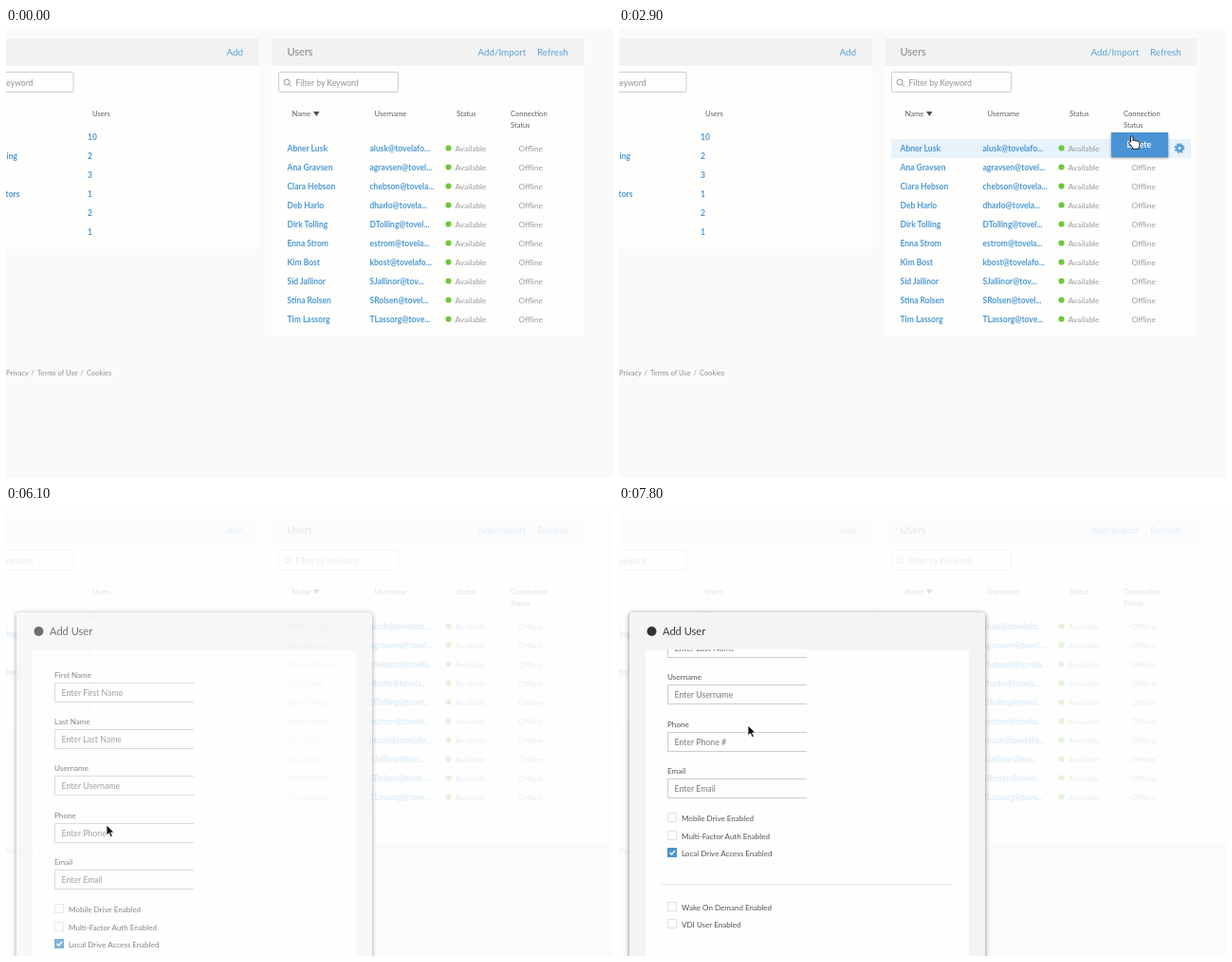
An HTML page for the animation above (8 s loop, 640 px wide and 474 px high).

```html
<!DOCTYPE html>
<html lang="en">
<head>
<meta charset="utf-8">
<title>User admin</title>
<style>
html, body { margin: 0; width: 100%; height: 100%; overflow: hidden; background: #fafafb; }
svg { display: block; width: 640px; height: 474px; font-family: Lato, "Open Sans", sans-serif; }
.link { fill: #5aa2d6; font-size: 9.8px; }
.title { fill: #858585; font-size: 11px; }
.head { fill: #606060; font-size: 7.6px; }
.cell { fill: #9a9a9a; font-size: 8.4px; }
.bold { fill: #4c98d0; font-size: 8.5px; font-weight: 700; }
.hint { fill: #929292; font-size: 8.6px; }
.entry { fill: #7c7c7c; font-size: 8.75px; }
.foot { fill: #909090; font-size: 7.5px; }
.name { fill: #3c3c3c; font-size: 11.1px; }
.label { fill: #555; font-size: 8.15px; }
.check { fill: #555; font-size: 8.05px; }
.white { fill: #fefefd; }
.bar { fill: #f2f2f2; }
.box { fill: #fefefe; stroke: #cfcfcf; }
.modal { filter: drop-shadow(0 1px 2.5px rgba(0,0,0,.5)); }

.anim { animation: 8s linear infinite; }
#cursor { animation-name: travel; }
#hand { animation-name: hand; animation-timing-function: step-end; }
#arrow { animation-name: arrow; animation-timing-function: step-end; }
#hover { animation-name: hover; animation-timing-function: step-end; }
#menu { animation-name: menu; }
#menuOn { animation-name: menu-on; animation-timing-function: step-end; }
#veil { animation-name: veil; }
#pick { animation-name: pick; }
#pickOn { animation-name: pick-on; animation-timing-function: step-end; }
#form { animation-name: form; }
#fields { animation-name: scroll; }
#thumb { animation-name: thumb; }
#thumbFade { animation-name: thumb-fade; }

@keyframes travel {
  0%, 1.25% { transform: translate(648px, 290px); }
  8.75% { transform: translate(608px, 165px); }
  12.5%, 23.75% { transform: translate(591px, 127px); animation-timing-function: ease-in-out; }
  30%, 37% { transform: translate(541px, 114px); animation-timing-function: ease-in-out; }
  43.75%, 47.5% { transform: translate(558px, 24px); animation-timing-function: ease-in-out; }
  50.5%, 61.25% { transform: translate(534px, 24px); animation-timing-function: ease-in-out; }
  65.5%, 81.25% { transform: translate(106px, 336px); animation-timing-function: ease-in-out; }
  83.5%, 100% { transform: translate(136px, 231px); }
}
@keyframes hand {
  0%, 25%, 38%, 62%, 73.75%, 100% { opacity: 0; }
  12%, 28%, 43%, 65% { opacity: 1; }
}
@keyframes arrow {
  0%, 25%, 38%, 62%, 73.75%, 100% { opacity: 1; }
  12%, 28%, 43%, 65% { opacity: 0; }
}
@keyframes hover {
  0% { opacity: 0; transform: translateY(20px); }
  10% { opacity: 1; transform: translateY(20px); }
  11.5% { opacity: 1; transform: none; }
  38.7%, 100% { opacity: 0; transform: none; }
}
@keyframes menu {
  0%, 25% { opacity: 0; }
  26.2%, 38.7% { opacity: 1; }
  42.5%, 48.7% { opacity: .35; }
  50%, 100% { opacity: 0; }
}
@keyframes menu-on {
  0%, 38.7%, 100% { opacity: 0; }
  28.5% { opacity: 1; }
}
@keyframes veil { 0%, 52.5% { opacity: 0; } 56.25%, 100% { opacity: 1; } }
@keyframes pick {
  0%, 52.5% { opacity: 0; }
  56.25%, 73% { opacity: 1; }
  75%, 100% { opacity: 0; }
}
@keyframes pick-on { 0%, 100% { opacity: 0; } 65% { opacity: 1; } }
@keyframes form { 0%, 73.2% { opacity: 0; } 77.5%, 100% { opacity: 1; } }
@keyframes scroll {
  0%, 85% { transform: none; animation-timing-function: ease-in-out; }
  91.25%, 100% { transform: translateY(-96px); }
}
@keyframes thumb {
  0%, 85% { transform: none; animation-timing-function: ease-in-out; }
  91.25%, 100% { transform: translateY(74px); }
}
@keyframes thumb-fade {
  0%, 84.5% { opacity: 0; }
  85%, 93.75% { opacity: 1; }
  97.5%, 100% { opacity: 0; }
}
</style>
</head>
<body>
<svg viewBox="0 0 640 474">
  <defs>
    <linearGradient id="shade" x2="0" y2="1">
      <stop stop-color="#f8f8f9"/><stop offset="1" stop-color="#e3e4e8"/>
    </linearGradient>
    <clipPath id="view"><rect x="28" y="151.5" width="341" height="330"/></clipPath>
  </defs>
  <rect width="640" height="474" fill="#fafafb"/>

  <!-- left panel -->
  <rect class="white" x="-5" y="11" width="272" height="221"/>
  <rect class="bar" x="-5" y="11" width="272" height="29"/>
  <text class="link" x="232.5" y="29">Add</text>
  <rect class="box" x="-50.5" y="46.5" width="121.5" height="21" rx="1"/>
  <text class="hint" x="28.5" y="61" text-anchor="end">Filter by Keyword</text>
  <text class="head" x="91" y="93">Users</text>
  <text class="bold" x="12" y="138" text-anchor="end">ing</text>
  <text class="bold" x="14.5" y="178" text-anchor="end">tors</text>
  <g id="counts"></g>

  <!-- right panel -->
  <rect class="white" x="280" y="11" width="329" height="313"/>
  <rect class="bar" x="280" y="11" width="329" height="29"/>
  <text class="title" x="296.5" y="29">Users</text>
  <text class="link" x="497.5" y="29">Add/Import</text>
  <text class="link" x="560" y="29">Refresh</text>
  <rect class="box" x="287.5" y="46.5" width="126" height="21" rx="1"/>
  <g fill="none" stroke="#999"><circle cx="296" cy="57" r="3"/><path d="M298.2 59.2l2.6 2.6"/></g>
  <text class="hint" x="305.5" y="61">Filter by Keyword</text>
  <text class="head" x="301.5" y="93">Name</text>
  <path d="M324 88h6.5l-3.2 5z" fill="#505050"/>
  <text class="head" x="388.5" y="93">Username</text>
  <text class="head" x="475" y="93">Status</text>
  <text class="head" x="532" y="93">Connection</text>
  <text class="head" x="532" y="105">Status</text>
  <g id="hover" class="anim">
    <rect x="287" y="117" width="316" height="20" fill="#e7f2fb"/>
    <circle cx="591" cy="126.5" r="2.9" fill="none" stroke="#5b9fd6" stroke-width="2.6"/>
    <circle cx="591" cy="126.5" r="4.6" fill="none" stroke="#5b9fd6" stroke-width="1.6" stroke-dasharray="2 1.613"/>
  </g>
  <g id="rows"></g>
  <text class="foot" x="24" y="366" text-anchor="end">Privacy</text>
  <text class="foot" x="26.5" y="366">/</text>
  <text class="foot" x="33" y="366">Terms of Use</text>
  <text class="foot" x="78.5" y="366">/</text>
  <text class="foot" x="85" y="366">Cookies</text>

  <g id="menu" class="anim">
    <rect x="519" y="110" width="60" height="26" fill="#fdfdfd" style="filter:drop-shadow(0 1px 1.5px rgba(0,0,0,.4))"/>
    <text x="535.5" y="126" font-size="8.6" fill="#999">Delete</text>
    <g id="menuOn" class="anim">
      <rect x="519" y="110" width="60" height="26" fill="#4a94d6"/>
      <text x="535.5" y="126" font-size="8.6" font-weight="700" fill="#fff">Delete</text>
    </g>
  </g>

  <g id="veil" class="anim">
    <rect width="640" height="474" fill="#fefefe" opacity=".82"/>
    <rect x="386" y="356" width="254" height="118" fill="#fbfbfd"/>
  </g>

  <!-- add or import dialog -->
  <g id="pick" class="anim">
    <rect class="modal" x="11" y="185.5" width="375" height="275.5" rx="3" fill="#f4f4f5"/>
    <path d="M11 411h375v47a3 3 0 0 1-3 3h-369a3 3 0 0 1-3-3z" fill="url(#shade)"/>
    <path d="M11 411h375" stroke="#e6e6e8"/>
    <circle cx="34.5" cy="207" r="5" fill="#333"/>
    <text class="name" x="46" y="211">Tovela Forge Inc</text>
    <rect class="white" x="28" y="226" width="341" height="176"/>
    <rect x="28" y="226" width="341" height="27" fill="#eeeeef"/>
    <text x="47.5" y="242" font-size="10.2" fill="#777">Add/Import Users</text>
    <rect class="box" x="74.5" y="269.5" width="103" height="115" rx="2"/>
    <rect id="pickOn" class="anim" x="74.5" y="269.5" width="103" height="115" rx="2" fill="#f4f4f5" stroke="#cfcfcf"/>
    <circle cx="125" cy="318" r="37" fill="#babac0"/>
    <path d="M109.5 318h31M125 302.5v31" stroke="#fff" stroke-width="12" stroke-linecap="round"/>
    <text x="104" y="377" font-size="11" fill="#555">Add User</text>
    <rect class="box" x="215.5" y="269.5" width="103" height="115" rx="2"/>
    <g fill="none" stroke="#b8b8be" stroke-width="5.5" stroke-linejoin="round">
      <path d="M233 278h43l23 22v56q0 2-2 2h-64q-2 0-2-2v-76q0-2 2-2z"/>
      <path d="M276 278v22h23"/>
      <path d="M254 314l22 32" stroke-width="7"/>
      <path d="M276 314l-22 32" stroke-width="5"/>
      <path d="M248 314h14M268 314h14M248 346h14M268 346h14" stroke-width="5"/>
    </g>
    <text x="235.5" y="377" font-size="11" fill="#555">Import Users</text>
    <rect x="294" y="424" width="73" height="23" rx="2" fill="#bac4ca"/>
    <text x="330.5" y="439" font-size="10.8" font-weight="700" fill="#fff" text-anchor="middle">Close</text>
  </g>

  <!-- new user dialog -->
  <g id="form" class="anim">
    <rect class="modal" x="11" y="112" width="375" height="400" rx="3" fill="#f4f4f5"/>
    <circle cx="34.5" cy="132" r="5" fill="#333"/>
    <text class="name" x="46" y="136">Add User</text>
    <rect class="white" x="28" y="151.5" width="341" height="330"/>
    <g clip-path="url(#view)">
      <g id="fields" class="anim"></g>
      <g id="thumbFade" class="anim">
        <rect id="thumb" class="anim" x="361.5" y="153" width="5.5" height="310" rx="2.7" fill="#000" fill-opacity=".45"/>
      </g>
    </g>
  </g>

  <g id="cursor" class="anim">
    <path id="arrow" class="anim" d="M0 0v11l2.6-2.4 1.7 4 2-.9-1.7-3.8h3.4z" fill="#111" stroke="#fff" stroke-width=".8"/>
    <path id="hand" class="anim" d="M-1.5 1q0-1.2 1.2-1.2T1 1v4q.2-1 1.3-.9t1.2 1.2q.3-.8 1.3-.6t1.1 1.2q.3-.6 1.1-.4t.9 1.3v2.4q0 1.3-1 2.6v1.7h-6.4v-1.5l-3.8-4.6q-.5-1 .4-1.5t1.4.5z" fill="#fff" stroke="#222" stroke-linejoin="round"/>
  </g>
</svg>
<script>
const users = [
  ["Abner Lusk", "alusk@tovelafo..."],
  ["Ana Gravsen", "agravsen@tovel..."],
  ["Clara Hebson", "chebson@tovela..."],
  ["Deb Harlo", "dharlo@tovela..."],
  ["Dirk Tolling", "DTolling@tovel..."],
  ["Enna Strom", "estrom@tovela..."],
  ["Kim Bost", "kbost@tovelafo..."],
  ["Sid Jallinor", "SJallinor@tov..."],
  ["Stina Rolsen", "SRolsen@tovel..."],
  ["Tim Lassorg", "TLassorg@tove..."]
];
const text = (cls, x, y, str) => `<text class="${cls}" x="${x}" y="${y}">${str}</text>`;
const fill = (id, list, draw) => {
  document.getElementById(id).innerHTML += list.map(draw).join("");
};

fill("counts", [10, 2, 3, 1, 2, 1], (n, i) => text("bold", 86, 118 + 20 * i, n));

fill("rows", users, ([name, login], i) => {
  const y = 130 + 20 * i;
  return text("bold", 296.5, y, name) + text("bold", 383.5, y, login) +
    `<circle cx="466.5" cy="${y - 3.5}" r="3.1" fill="#70c63c"/>` +
    text("cell", 473.5, y, "Available") + text("cell", 540.5, y, "Offline");
});

fill("fields", ["First Name", "Last Name", "Username", "Phone", "Email"], (label, i) => {
  const y = Math.round(49.2 * i);
  const hint = "Enter " + label + (label === "Phone" ? " #" : "");
  return text("label", 51, 180.5 + y, label) +
    `<rect x="51" y="${186 + y}" width="147" height="21" fill="#fefefe"/>
     <path d="M198 ${186.5 + y}h-146.5v20h146.5" fill="none" stroke="#cdcdcd"/>` +
    text("entry", 58.5, 199.8 + y, hint);
});

const checks = [
  ["Mobile Drive Enabled", 424], ["Multi-Factor Auth Enabled", 443], ["Local Drive Access Enabled", 461],
  ["Wake On Demand Enabled", 518], ["VDI User Enabled", 536]
];
fill("fields", checks, ([label, y], i) => {
  const on = i === 2;
  return `<rect x="51.5" y="${y - 4.5}" width="9" height="9" fill="${on ? "#4a94cf" : "#fefefe"}" stroke="${on ? "#4a94cf" : "#e2e2e2"}"/>` +
    (on ? `<path d="M53.5 ${y}l2 2 3.5-4" fill="none" stroke="#fff" stroke-width="1.4"/>` : "") +
    text("check", 66, y + 3.5, label);
});
fill("fields", [494.5], y => `<path d="M44 ${y}h308" stroke="#e8e8e8"/>`);
</script>
</body>
</html>
```
